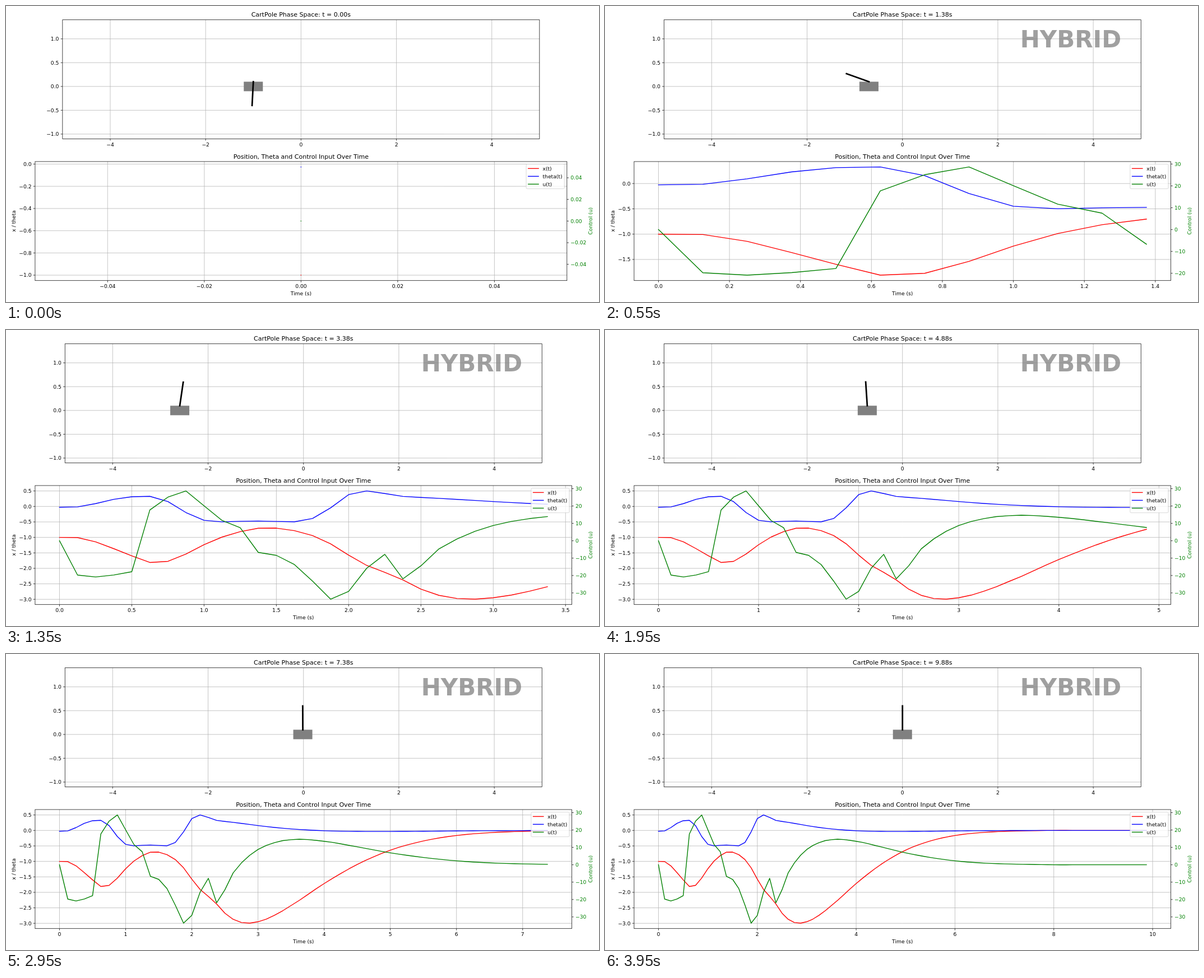
Write an HTML page with a canvas that moves like this. It is 1058 by 529 pixels and loops after 4000 ms.

```html
<!DOCTYPE html>
<html lang="en">
<head>
<meta charset="utf-8">
<style>
html, body { margin: 0; width: 100%; height: 100%; overflow: hidden; background: #fff; }
canvas { display: block; }
</style>
</head>
<body>
<canvas id="stage" width="1058" height="529"></canvas>
<script>
const c = document.getElementById('stage').getContext('2d');
const PT = 0.9183;                       // one typographic point in pixels
const EM = 10 * PT, GAP = 7 * PT;        // label size, distance from axis to label
const STEP = 0.125, FRAMES = 80, FRAME_MS = 50;
const FONT = '"DejaVu Sans", sans-serif';
const GRID = '#b0b0b0', GREEN = '#008000';

// First 28 samples one by one, then one knot every 4 samples until rest.
const series = {
  x: smoothTail(
    [-1, -1.007, -1.143, -1.363, -1.596, -1.81, -1.774, -1.538, -1.236, -.988, -.814, -.703, -.7, -.782,
     -.94, -1.207, -1.573, -1.905, -2.13, -2.374, -2.673, -2.872, -2.973, -2.995, -2.95, -2.864, -2.74, -2.593],
    [-2.425, -1.715, -1.1, -.638, -.34, -.163, -.073, -.03, -.01]),
  theta: smoothTail(
    [-.026, -.015, .092, .229, .314, .327, .156, -.198, -.449, -.498, -.479, -.471, -.485, -.495,
     -.39, -.045, .382, .5, .418, .324, .291, .262, .228, .194, .158, .126, .097, .072],
    [.05, -.01, -.03, -.032, -.025, -.016, -.009, -.005, -.002]),
  u: smoothTail(
    [0, -19.75, -20.85, -19.7, -17.8, 17.7, 25.1, 28.65, 20.1, 11.65, 7.5, -6.7, -8.4, -13.7,
     -23.2, -33.6, -29.1, -15.8, -7.8, -21.9, -14.4, -4.65, 1.06, 5.46, 8.77, 11.1, 12.75, 13.9],
    [14.4, 13.5, 10.3, 6.85, 4.2, 2.25, 1.1, .5, .2])
};

function smoothTail(head, knots) {
  const k = i => i < 0 ? head[24 + 4 * i] : i ? knots[i - 1] ?? 0 : head[24];
  const out = head.slice();
  for (let n = 28; n < FRAMES; n++) {
    const i = Math.floor((n - 24) / 4), f = (n % 4) / 4;
    const a = k(i), b = k(i + 1), m = (b - k(i - 1)) / 2, q = (k(i + 2) - a) / 2;
    out.push(a + f * (m + f * (3 * (b - a) - 2 * m - q + f * (2 * (a - b) + m + q))));
  }
  return out;
}

// Data range with a 5% margin on both sides.
function limits(values) {
  let lo = Math.min(...values), hi = Math.max(...values);
  if (lo === hi) { lo -= .05; hi += .05; }
  const pad = (hi - lo) * .05;
  return [lo - pad, hi + pad];
}

// At most nine intervals of a round size.
function ticks([lo, hi]) {
  const raw = (hi - lo) / 9, p = 10 ** Math.floor(Math.log10(raw));
  const step = +([1, 2, 2.5, 5, 10].find(s => s * p >= raw) * p).toPrecision(3);
  const digits = (String(step).split('.')[1] || '').length;
  const list = [];
  for (let i = Math.ceil(lo / step); i <= Math.floor(hi / step); i++)
    list.push({ v: i * step, label: (i * step + 0).toFixed(digits).replace('-', '\u2212') });
  return list;
}

const scale = ([lo, hi], a, b) => v => a + (v - lo) / (hi - lo) * (b - a);

function text(s, x, y, align = 'center', color = '#000', size = EM, weight = '') {
  c.font = `${weight} ${size}px ${FONT}`;
  c.textAlign = align;
  c.fillStyle = color;
  c.fillText(s, x, y);
}

function upright(s, x, y, color) {
  c.save();
  c.translate(x, y);
  c.rotate(-Math.PI / 2);
  text(s, 0, 0, 'center', color);
  c.restore();
}

function line(points, color, width, cap = 'butt') {
  c.beginPath();
  for (const [x, y] of points) c.lineTo(x, y);
  c.strokeStyle = color;
  c.lineWidth = width * PT;
  c.lineCap = cap;
  c.lineJoin = 'round';
  c.stroke();
}

function grid(box, xs, ys, px, py) {
  for (const t of xs) line([[px(t.v), box.t], [px(t.v), box.b]], GRID, .8);
  for (const t of ys) line([[box.l, py(t.v)], [box.r, py(t.v)]], GRID, .8);
}

function frame(box, xs, ys, px, py) {
  const tick = 3.5 * PT;
  for (const t of xs) {
    const x = px(t.v);
    line([[x, box.b], [x, box.b + tick]], '#000', .8);
    text(t.label, x, box.b + GAP + 6.9);
  }
  for (const t of ys) {
    const y = py(t.v);
    line([[box.l - tick, y], [box.l, y]], '#000', .8);
    text(t.label, box.l - GAP, y + 3.45, 'right');
  }
  c.strokeStyle = '#000';
  c.lineWidth = .8 * PT;
  c.lineJoin = 'miter';
  c.strokeRect(box.l, box.t, box.r - box.l, box.b - box.t);
}

function labelWidth(list) {
  c.font = `${EM}px ${FONT}`;
  return Math.max(...list.map(t => c.measureText(t.label).width));
}

function legend(right, top) {
  const left = right - 68.1;
  c.beginPath();
  c.roundRect(left, top, 68.1, 44, 1.8);
  c.fillStyle = 'rgba(255,255,255,.8)';
  c.fill();
  c.strokeStyle = 'rgba(204,204,204,.8)';
  c.lineWidth = PT;
  c.stroke();
  [['x(t)', '#f00'], ['theta(t)', '#00f'], ['u(t)', GREEN]].forEach(([name, color], i) => {
    const y = top + 7.8 + 14 * i;
    line([[left + 3.7, y], [left + 22, y]], color, 1.5, 'square');
    text(name, left + 29.4, y + 3.2, 'left');
  });
}

function drawCart(n, mid) {
  const box = { l: mid - 425.5, r: mid + 425.5, t: 24.7, b: 237.4 };
  const xr = [-5, 5], yr = [-1.1, 1.4];
  const px = scale(xr, box.l, box.r), py = scale(yr, box.b, box.t);
  const xs = ticks(xr), ys = ticks(yr);
  grid(box, xs, ys, px, py);

  const x = series.x[n], dx = series.theta[n];
  const up = (n > 8 && n < 13) || n > 16;
  const dy = Math.sqrt(Math.max(0, .25 - dx * dx)) * (up ? 1 : -1);
  c.fillStyle = '#808080';
  c.fillRect(px(x - .2), py(.1), px(.4) - px(0), py(0) - py(.2));
  line([[px(x), py(.1)], [px(x + dx), py(.1 + dy)]], '#000', 3, 'square');

  frame(box, xs, ys, px, py);
  if (n) text('HYBRID', mid + 209.9, 74, 'left', 'rgba(128,128,128,.75)', 42, 'bold');
  // Ties in the last digit round to even.
  const time = (n * STEP - (n % 4 === 1 ? 1e-6 : 0)).toFixed(2);
  text(`CartPole Phase Space: t = ${time}s`, mid, box.t - 5.5, 'center', '#000', 12 * PT);
}

function draw(n) {
  c.fillStyle = '#fff';
  c.fillRect(0, 0, 1058, 529);

  const past = key => series[key].slice(0, n + 1);
  const tr = limits([0, n * STEP]);
  const yr = limits([...past('x'), ...past('theta')]);
  const ur = limits(past('u'));
  const ts = ticks(tr), ys = ticks(yr), us = ticks(ur);

  // Side margins follow the widest labels.
  const box = { l: 23.2 + GAP + labelWidth(ys), r: 1035.35 - GAP - labelWidth(us), t: 278, b: 490.7 };
  const mid = (box.l + box.r) / 2, cy = (box.t + box.b) / 2;
  const pt = scale(tr, box.l, box.r), py = scale(yr, box.b, box.t), pu = scale(ur, box.b, box.t);

  drawCart(n, mid);

  grid(box, ts, ys, pt, py);
  const curve = (key, color, p) => line(past(key).map((v, i) => [pt(i * STEP), p(v)]), color, 1.5, 'square');
  curve('x', '#f00', py);
  curve('theta', '#00f', py);
  curve('u', GREEN, pu);
  frame(box, ts, ys, pt, py);
  for (const t of us) {
    const y = pu(t.v);
    line([[box.r, y], [box.r + 3.5 * PT, y]], '#000', .8);
    text(t.label, box.r + GAP, y + 3.45, 'left', GREEN);
  }
  text('Position, Theta and Control Input Over Time', mid, box.t - 5.5, 'center', '#000', 12 * PT);
  text('Time (s)', mid, 517.1);
  upright('x / theta', 16.9, cy, '#000');
  upright('Control (u)', 1046, cy, GREEN);
  legend(box.r - 4.6, box.t + 4.6);
}

function loop() {
  draw(Math.floor(performance.now() / FRAME_MS) % FRAMES);
  requestAnimationFrame(loop);
}
loop();
</script>
</body>
</html>
```
